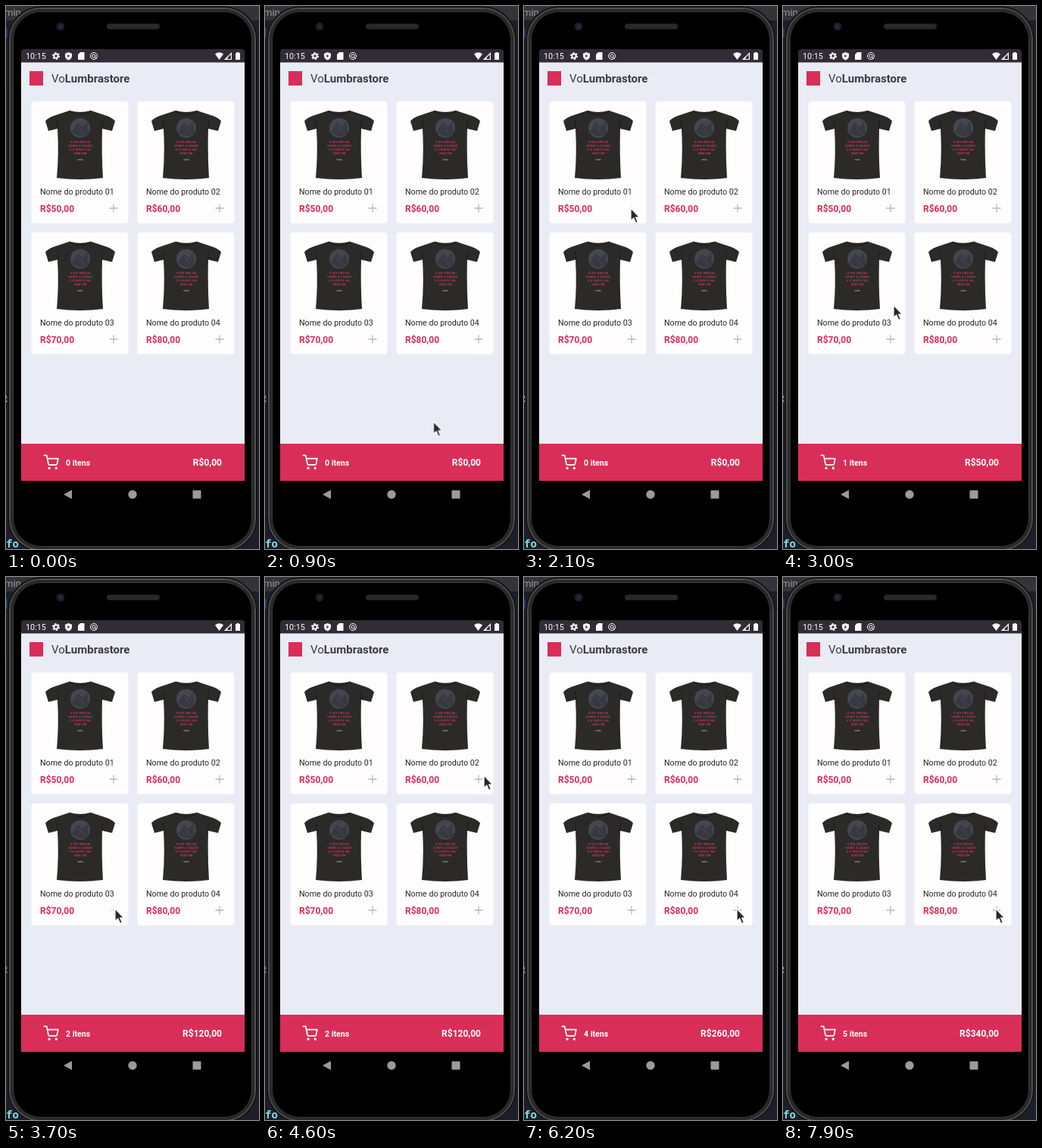
Write an HTML page that moves like this. It is 334x717 px and loops after 8000 ms.

```html
<!DOCTYPE html>
<html lang="pt-BR">
<head>
<meta charset="utf-8">
<title>Loja</title>
<style>
  html, body { margin: 0; width: 100%; height: 100%; overflow: hidden; background: #1d1e29; }
  svg { display: block; width: 334px; height: 717px; font-family: Roboto, sans-serif; }
  .mono { font-family: "Noto Sans Mono", "DejaVu Sans Mono", monospace; }
  .name { font-size: 10.7px; fill: #28252c; }
  .price { font-size: 12px; font-weight: 700; fill: #d82e58; }
  .print { font-size: 4.1px; font-weight: 700; fill: #b5365a; text-anchor: middle; }
  .plus { stroke: #b9b7bd; stroke-width: 1.3; }
  .items { font-size: 10.6px; font-weight: 700; fill: #fff; }
  .sum { font-size: 12px; font-weight: 700; fill: #fff; text-anchor: end; }

  .plus, #totals, #cursor { animation: 8s step-end infinite; }
  #plus1 { animation-name: tap1; }
  #plus2 { animation-name: tap2; }
  #plus3 { animation-name: tap3; }
  #plus4 { animation-name: tap4; }
  #totals { animation-name: totals; }
  #cursor { animation-name: cursor; }

  @keyframes tap1 {
    0%, 32.5%, 100% { opacity: 1 }
    23.75% { opacity: .6 }
    25%, 28.75% { opacity: .15 }
    30% { opacity: .5 }
    31.25% { opacity: .8 }
  }
  @keyframes tap2 {
    0%, 62.5%, 100% { opacity: 1 }
    58.75% { opacity: .6 }
    60% { opacity: .2 }
    61.25% { opacity: .5 }
  }
  @keyframes tap3 {
    0%, 47.5%, 100% { opacity: 1 }
    43.75% { opacity: .6 }
    45% { opacity: .2 }
    46.25% { opacity: .35 }
  }
  @keyframes tap4 {
    0%, 77.5%, 95%, 100% { opacity: 1 }
    75%, 92.5% { opacity: .3 }
    76.25%, 93.75% { opacity: .6 }
  }
  @keyframes totals {
    0% { transform: none }
    28.75% { transform: translateY(-60px) }
    46.25% { transform: translateY(-120px) }
    61.25% { transform: translateY(-180px) }
    76.25% { transform: translateY(-240px) }
    93.75%, 100% { transform: translateY(-300px) }
  }
  @keyframes cursor {
    0% { opacity: 0; transform: translate(307px, 623px) }
    10% { opacity: 1; transform: translate(307px, 623px); animation-timing-function: steps(3) }
    13.75% { transform: translate(53px, 400px); animation-timing-function: steps(2) }
    16.25% { transform: translate(152px, 297px); animation-timing-function: steps(3) }
    20% { transform: translate(136px, 272px) }
    21.25% { transform: translate(135px, 271px) }
    23.75% { transform: translate(139px, 268px) }
    25% { transform: translate(141px, 267px) }
    28.75% { transform: translate(141px, 267px); animation-timing-function: steps(3) }
    32.5% { transform: translate(149px, 304px) }
    35% { transform: translate(147px, 378px) }
    37.5% { transform: translate(146px, 395px); animation-timing-function: steps(3) }
    41.25% { transform: translate(144px, 438px) }
    48.75% { transform: translate(160px, 412px) }
    50% { transform: translate(188px, 365px) }
    52.5% { transform: translate(215px, 335px); animation-timing-function: steps(3) }
    56.25% { transform: translate(292px, 264px) }
    57.5% { transform: translate(289px, 262px) }
    58.75% { transform: translate(283px, 264px) }
    60% { transform: translate(281px, 265px) }
    63.75% { transform: translate(279px, 275px); animation-timing-function: steps(2) }
    66.25% { transform: translate(269px, 335px); animation-timing-function: steps(2) }
    68.75% { transform: translate(272px, 400px); animation-timing-function: steps(3) }
    72.5%, 100% { transform: translate(281px, 438px) }
    100% { opacity: 1 }
  }
</style>
</head>
<body>
<svg viewBox="0 0 334 717">
  <defs>
    <clipPath id="barClip"><path d="M20 578h295v49H20z"/></clipPath>
    <g id="shirt">
      <path fill="#2b2a29" d="M84 138 Q98 142 112 138 L133 145 Q141 148 144 152 L140 165 L127 162 Q126 196 128 227 Q98 231 67 227 Q70 196 68 162 L56 165 L52 152 Q55 148 63 145Z"/>
      <path fill="none" stroke="#1b1a1a" d="M84 139 Q98 148 112 139 M68 162 Q69 156 67 151 M127 162 Q126 156 128 151"/>
      <circle cx="98" cy="161" r="13" fill="#44474f"/>
      <path fill="#363941" d="M87 166 L95 154 L101 160 L107 153 L109 168 Q99 177 87 166Z"/>
      <path fill="none" stroke="#6f4050" stroke-width=".8" d="M95 158 L103 168"/>
      <g class="print">
        <text x="98" y="181">O SOL BRILHA</text>
        <text x="98" y="186">SOBRE A CIDADE</text>
        <text x="98" y="191">E O VENTO VAI</text>
        <text x="98" y="196">SEM FIM</text>
        <text x="98" y="204" style="font-size:3px;fill:#999">vento</text>
      </g>
    </g>
  </defs>

  <!-- desktop behind the phone -->
  <path fill="#1d1e29" d="M0 0h334v717H0z"/>
  <path fill="#343338" d="M0 0h334v19H0z"/>
  <text x="-2" y="13" font-size="13" fill="#97969b">min</text>
  <path fill="#1f4a78" d="M0 29h1.5v13H0z"/>
  <text class="mono" x="-5" y="523" font-size="12" fill="#aaa">R</text>
  <text class="mono" x="0" y="715" font-size="14" font-weight="700" fill="#86d9e2">fo (</text>

  <!-- phone -->
  <g fill="#0a0a0b">
    <rect x="2.5" y=".5" width="329" height="720" rx="44" stroke="#1c1c1d"/>
    <rect x="5" y="3" width="324" height="715" rx="41.5" stroke="#505052" stroke-width="2"/>
    <rect x="7.500" y="5.500" width="319" height="710" rx="39" stroke="#2a2a2b" stroke-width="3"/>
    <rect x="9.500" y="7.500" width="315" height="706" rx="37" fill="#000" stroke="#39393a"/>
  </g>
  <circle cx="72" cy="27" r="5.500" fill="#1b1b20"/>
  <circle cx="72" cy="27" r="3" fill="#22263f"/>
  <rect x="133" y="23.5" width="70" height="7" rx="3.5" fill="#2a2828" stroke="#1b1a1a"/>

  <!-- screen -->
  <path fill="#e9ecf5" d="M20 70h295v557H20z"/>
  <path fill="#322c36" d="M20 74.500V61q0-4 4-4h287q4 0 4 4v13.500z"/>
  <text x="26" y="70" font-size="10.8" fill="#fff">10:15</text>
  <g fill="none" stroke="#fff">
    <circle cx="66" cy="66" r="2.7" stroke-width="2"/>
    <circle cx="66" cy="66" r="4.3" stroke-width="1.6" stroke-dasharray="2.2 2.3"/>
    <circle cx="116" cy="66" r="4.5"/>
    <circle cx="116" cy="66" r="2.1"/>
    <path d="M117 67l2.5 2.5"/>
  </g>
  <g fill="#fff">
    <path d="M82.5 61l4.5 1.7v3q0 4-4.5 5.8q-4.5-1.8-4.5-5.8v-3z"/>
    <path fill="#322c36" d="M81.3 64l3 2-3 2z"/>
    <path d="M98 61h5.5v10h-8.5v-7z"/>
    <path d="M276 63.5q5.5-4.5 11 0L281.5 71z"/>
    <path d="M298 61v10h-10zM296.8 64l-6 6h6z" fill-rule="evenodd"/>
    <path d="M292.5 66.5v4.5h-4.5z"/>
    <path d="M303 62h1.5v-1h3v1h1.5v9h-6z"/>
  </g>

  <rect x="31" y="86" width="18" height="19" fill="#d82e58"/>
  <text x="60" y="101" font-size="15" fill="#3d3a45">Vo<tspan font-weight="700">Lumbrastore</tspan></text>

  <g id="cards"></g>

  <!-- cart bar -->
  <path fill="#d82e58" d="M20 578h295v49H20z"/>
  <g transform="translate(49.5 592.5) scale(.84)" fill="none" stroke="#fff" stroke-width="2" stroke-linecap="round" stroke-linejoin="round">
    <circle cx="9" cy="21" r="1"/>
    <circle cx="20" cy="21" r="1"/>
    <path d="M1 1h4l2.68 13.39a2 2 0 0 0 2 1.61h9.72a2 2 0 0 0 2-1.61L23 6H6"/>
  </g>
  <g clip-path="url(#barClip)"><g id="totals"></g></g>

  <g fill="#9b9b9c">
    <path d="M76 645l11-6v12z"/>
    <circle cx="167" cy="645" r="5.7"/>
    <rect x="246.5" y="639.5" width="11" height="11" rx="1"/>
  </g>

  <g id="cursor">
    <path d="M0 0V16.5L3.800 13L6.500 19.500L9.300 18.300L6.600 12H11.500Z" fill="#2a282b" stroke="#fff" stroke-width="1.2" stroke-linejoin="round"/>
  </g>
</svg>
<script>
  const prices = [50, 60, 70, 80];
  const sums = [0, 50, 120, 180, 260, 340];
  const money = n => `R$${n},00`;

  const card = (price, i) => `
    <g transform="translate(${i % 2 * 140} ${(i >> 1) * 173})">
      <rect x="33.5" y="126" width="128" height="161" rx="4" fill="#fffdfe"/>
      <use href="#shirt"/>
      <text class="name" x="45" y="248.5">Nome do produto 0${i + 1}</text>
      <text class="price" x="45" y="272">${money(price)}</text>
      <path class="plus" id="plus${i + 1}" d="M136.5 267h11M142 261.5v11"/>
    </g>`;

  const total = (sum, i) => `
    <text class="items" x="79" y="${607 + i * 60}">${i} itens</text>
    <text class="sum" x="285" y="${607 + i * 60}">${money(sum)}</text>`;

  document.getElementById('cards').innerHTML = prices.map(card).join('');
  document.getElementById('totals').innerHTML = sums.map(total).join('');
</script>
</body>
</html>
```
